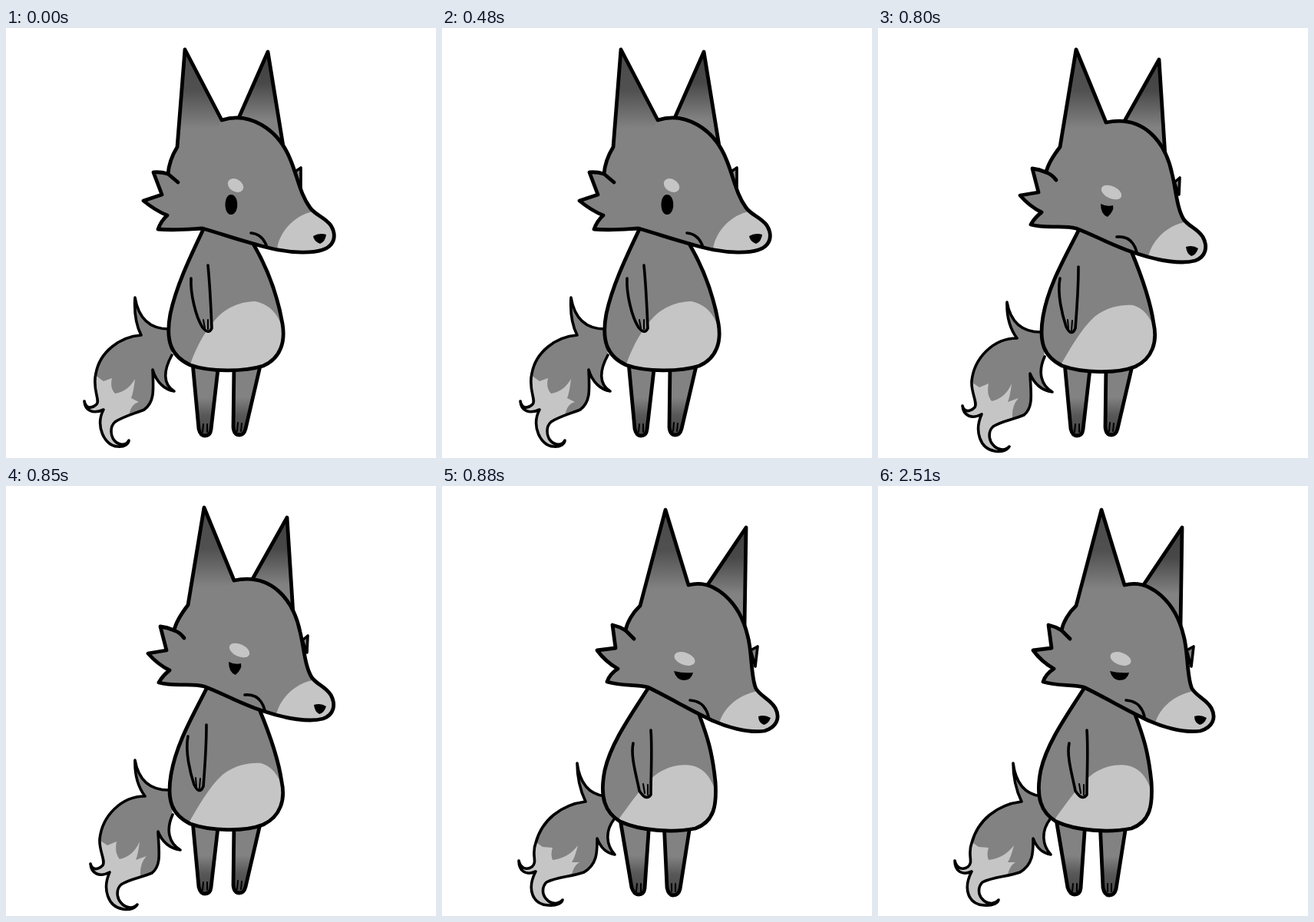
An HTML page that plays this animation: 560 px wide and 560 px high, repeating every 3.6 s.

```html
<!DOCTYPE html>
<html lang="en">
<head>
<meta charset="utf-8">
<title>Sad wolf</title>
<style>
  html, body { margin: 0; width: 100%; height: 100%; overflow: hidden; background: #fff; }
  svg { display: block; width: 560px; height: 560px; }
  .pose { opacity: 0; animation: 3600ms step-end infinite; }
  .pose0 { animation-name: upright; }
  .pose1 { animation-name: sinking; }
  .pose2 { animation-name: slumped; }
  @keyframes upright { 0% { opacity: 1 } 22.2222% { opacity: 0 } 100% { opacity: 0 } }
  @keyframes sinking { 0% { opacity: 0 } 22.2222% { opacity: 1 } 24.4444% { opacity: 0 } 100% { opacity: 0 } }
  @keyframes slumped { 0% { opacity: 0 } 24.4444% { opacity: 1 } 100% { opacity: 1 } }
  .fur { fill: #828282; }
  .light { fill: #c5c5c5; }
  .solid { fill: #000; }
  .ink { fill: none; stroke: #000; stroke-width: 4.8; stroke-linecap: round; stroke-linejoin: round; }
  .thin { stroke-width: 3.6; }
  .hair { stroke-width: 2; }
</style>
</head>
<body>
<svg id="stage" viewBox="0 0 560 560">
  <defs>
    <linearGradient id="earShade" x1="0" y1="0" x2="0" y2="1">
      <stop offset="0" stop-color="#4a4a4a"/>
      <stop offset=".4" stop-color="#505050"/>
      <stop offset=".78" stop-color="#828282"/>
    </linearGradient>
    <linearGradient id="farEarShade" x1="0" y1="0" x2="0" y2="1">
      <stop offset="0" stop-color="#404040"/>
      <stop offset=".3" stop-color="#484848"/>
      <stop offset=".66" stop-color="#828282"/>
    </linearGradient>
    <linearGradient id="legShade" x1="0" y1="0" x2="0" y2="1">
      <stop offset=".48" stop-color="#828282"/>
      <stop offset=".72" stop-color="#585858"/>
      <stop offset="1" stop-color="#444"/>
    </linearGradient>
  </defs>
</svg>
<script>
const standing = {
  legs: ['M243 436L251 522Q253 531 259 531Q266 531 267 523L277 436', 'M297 436L296 520Q297 530 304 530Q310 530 312 522L332 436'],
  toes: 'M257 516L256 526M262 516V526M302 514L301 525M307 515L306 525'
};

const poses = [
  {
    ...standing,
    tail: 'M214 392Q175 393 168 351Q166 380 176 400C148 402 122 422 117 450C112 470 123 485 118 490C112 496 104 496 102 486C103 499 114 503 127 497C116 518 128 544 145 545C155 546 160 541 160 537C156 545 146 543 141 537C136 531 135 519 142 513C152 506 168 502 180 497C194 487 192 470 191 445C196 462 207 471 219 473C204 464 205 446 216 426',
    tip: 'M116 452L127 460L138 456Q135 469 142 476Q158 474 168 457Q166 475 163 482L173 487Q162 490 160 506',
    body: 'M257 262C240 298 222 335 214 372C207 409 216 428 240 439C265 448 310 448 335 440C358 430 364 408 360 385C354 350 340 312 322 281',
    belly: 'M240 438C248 414 262 390 276 376C292 360 312 356 325 356C348 361 360 380 362 404',
    arm: 'M241 326C240 346 247 376 256 390Q264 400 268 391C267 368 266 340 263 309',
    fingers: 'M257 380L259 391M263 380V392',
    farTuft: 'M375 188L384 182L384 211Z',
    farEar: 'M304 115L341 31L361 154L335 165Z',
    farEarLine: 'M304 115L341 31L361 154',
    ear: 'M223 155L233 28L281 120L260 160Z',
    head: 'M223 155C215 168 212 178 211 190Q201 187 192 188L203 217L179 225Q195 238 210 244Q202 251 198 262C220 264 238 262 256 261C287 270 315 280 345 287C375 294 400 293 412 289C428 284 431 270 423 257C415 246 403 244 396 234C383 216 380 195 371 173C354 129 315 109 281 120L233 28Z',
    tuft: 'M211 190L224 201',
    muzzle: 'M353 288C355 268 374 244 400 239',
    brow: [299, 205, 11, 8, 32],
    eye: 'M293 217C304 217 304 243 293 243C283 243 283 217 293 217Z',
    mouth: 'M319 267Q333 268 339 283',
    nose: 'M400 271Q408 266 417 269Q416 278 409 281Q401 278 400 271Z'
  },
  {
    ...standing,
    tail: 'M214 396Q175 397 168 357Q167 385 181 404C150 404 125 430 122 460C121 475 130 488 126 494C120 500 112 501 110 492C111 505 122 510 135 503C125 525 133 548 152 551C162 553 169 549 171 545C165 552 155 549 150 543C144 537 143 525 150 519C160 512 176 510 190 504C203 494 199 475 198 450C204 465 214 472 227 474C212 465 208 448 217 428',
    tip: 'M120 460L132 468L144 463Q141 478 148 486Q166 482 174 463Q172 480 169 487L183 482Q172 494 176 514',
    body: 'M262 262C243 300 222 335 215 375C209 410 216 428 240 440C265 449 310 451 335 441C358 430 364 408 359 385C354 350 340 315 330 291',
    belly: 'M236 442C250 418 265 391 282 376C300 362 320 360 332 361C350 366 360 385 362 404',
    arm: 'M237 326C233 346 240 374 245 389Q252 403 257 391C259 366 261 336 261 311',
    fingers: 'M247 380L248 392M253 381L252 394',
    farTuft: 'M386 201L393 195L392 217Z',
    farEar: 'M320 123L366 41L374 167L345 175Z',
    farEarLine: 'M320 123L366 41L374 167',
    ear: 'M237 155L258 28L297 123L274 160Z',
    head: 'M237 155C227 168 221 178 219 188Q210 184 201 183L209 214L185 218Q197 232 213 240Q204 247 199 256C220 262 240 256 258 261C285 271 310 286 338 294C365 303 395 308 413 303C427 298 430 285 423 272C415 260 405 259 398 249C389 234 388 210 383 190C374 147 345 113 297 123L258 28Z',
    tuft: 'M219 188Q227 191 232 198',
    muzzle: 'M352 298C355 281 373 258 399 253',
    brow: [304, 214, 14, 8, 25],
    eye: 'M290 229Q298 233 306 231Q308 238 299 246Q290 243 290 229Z',
    mouth: 'M311 272Q331 270 337 292',
    nose: 'M401 285Q410 282 417 287Q414 296 408 297Q402 294 401 285Z'
  },
  {
    legs: ['M232 434L247 523Q250 532 256 532Q263 532 264 524L270 436', 'M289 436L293 523Q295 533 301 533Q308 533 310 525L324 436'],
    toes: 'M254 518L253 528M259 518V528M299 518V528M304 518V528',
    tail: 'M212 404Q181 400 176 361Q176 388 187 411C155 415 130 435 122 465C116 480 125 490 117 496C109 501 102 497 100 488C100 501 109 508 122 502C110 525 118 545 138 546C150 547 156 543 157 539C151 546 141 544 136 538C130 532 130 522 136 516C150 509 168 509 185 503C203 492 202 475 202 459C207 472 214 478 225 480C214 468 212 450 224 434',
    tip: 'M120 462L131 470L144 471Q141 480 144 487Q164 485 177 468Q173 484 169 490L179 490Q169 496 168 514',
    body: 'M268 264C245 300 220 335 212 370C205 405 212 425 232 437C258 449 300 452 330 446C355 437 358 415 356 385C352 345 345 325 335 298',
    belly: 'M228 437C247 411 263 387 281 374C298 363 315 362 325 364C345 368 352 385 359 404',
    arm: 'M249 335C245 352 254 380 257 397Q266 411 272 402C272 375 274 345 272 318',
    fingers: 'M262 388L264 400M268 389V402',
    farTuft: 'M402 214L411 209L408 235Z',
    farEar: 'M345 130L396 54L394 182L370 185Z',
    farEarLine: 'M345 130L396 54L394 182',
    ear: 'M258 156L291 31L321 129L295 163Z',
    head: 'M258 156C248 165 241 178 239 188Q231 183 222 181L226 211L202 214Q213 229 229 238Q218 245 215 255C235 261 250 258 268 262C295 275 320 290 343 301C370 315 400 322 420 319C436 314 441 302 434 289C427 277 416 275 409 264C402 250 404 215 398 195C388 152 355 120 321 129L291 31Z',
    tuft: 'M239 188L250 199',
    muzzle: 'M361 309C366 290 385 272 411 267',
    brow: [316, 225, 14, 8, 20],
    eye: 'M302 241Q314 244 327 243Q325 253 314 253Q305 252 302 241Z',
    mouth: 'M323 279Q342 280 347 300',
    nose: 'M412 300Q420 297 428 302Q425 310 419 311Q412 308 412 300Z'
  }
];

const path = (d, cls, extra = '') => `<path class="${cls}" d="${d}" ${extra}/>`;

// A furry shape with a pale patch kept inside its outline.
const patched = (id, d, patch, line, inner = '') =>
  `<clipPath id="${id}"><path d="${d}"/></clipPath>` +
  path(d, 'fur') + inner +
  path(patch, 'light', `clip-path="url(#${id})"`) +
  path(d, line);

const shaded = (d, shade) => `<path d="${d}" fill="url(#${shade})"/>`;

function drawPose(p, i) {
  const [x, y, rx, ry, turn] = p.brow;
  return `<g class="pose pose${i}">` +
    patched('tail' + i, p.tail, p.tip + 'V560H60V440Z', 'ink thin') +
    p.legs.map(d => shaded(d, 'legShade') + path(d, 'ink')).join('') +
    path(p.toes, 'ink hair') +
    patched('body' + i, p.body, p.belly + 'V460H220Z', 'ink') +
    path(p.arm, 'fur') + path(p.arm, 'ink thin') + path(p.fingers, 'ink hair') +
    path(p.farTuft, 'fur') + path(p.farTuft, 'ink thin') +
    shaded(p.farEar, 'farEarShade') + path(p.farEarLine, 'ink') +
    patched('head' + i, p.head, p.muzzle + 'L460 235V340H352Z', 'ink', shaded(p.ear, 'earShade')) +
    path(p.tuft, 'ink') +
    `<ellipse class="light" cx="${x}" cy="${y}" rx="${rx}" ry="${ry}" transform="rotate(${turn} ${x} ${y})"/>` +
    path(p.eye, 'solid') + path(p.nose, 'solid') + path(p.mouth, 'ink thin') +
    '</g>';
}

document.getElementById('stage').insertAdjacentHTML('beforeend', poses.map(drawPose).join(''));
</script>
</body>
</html>
```
